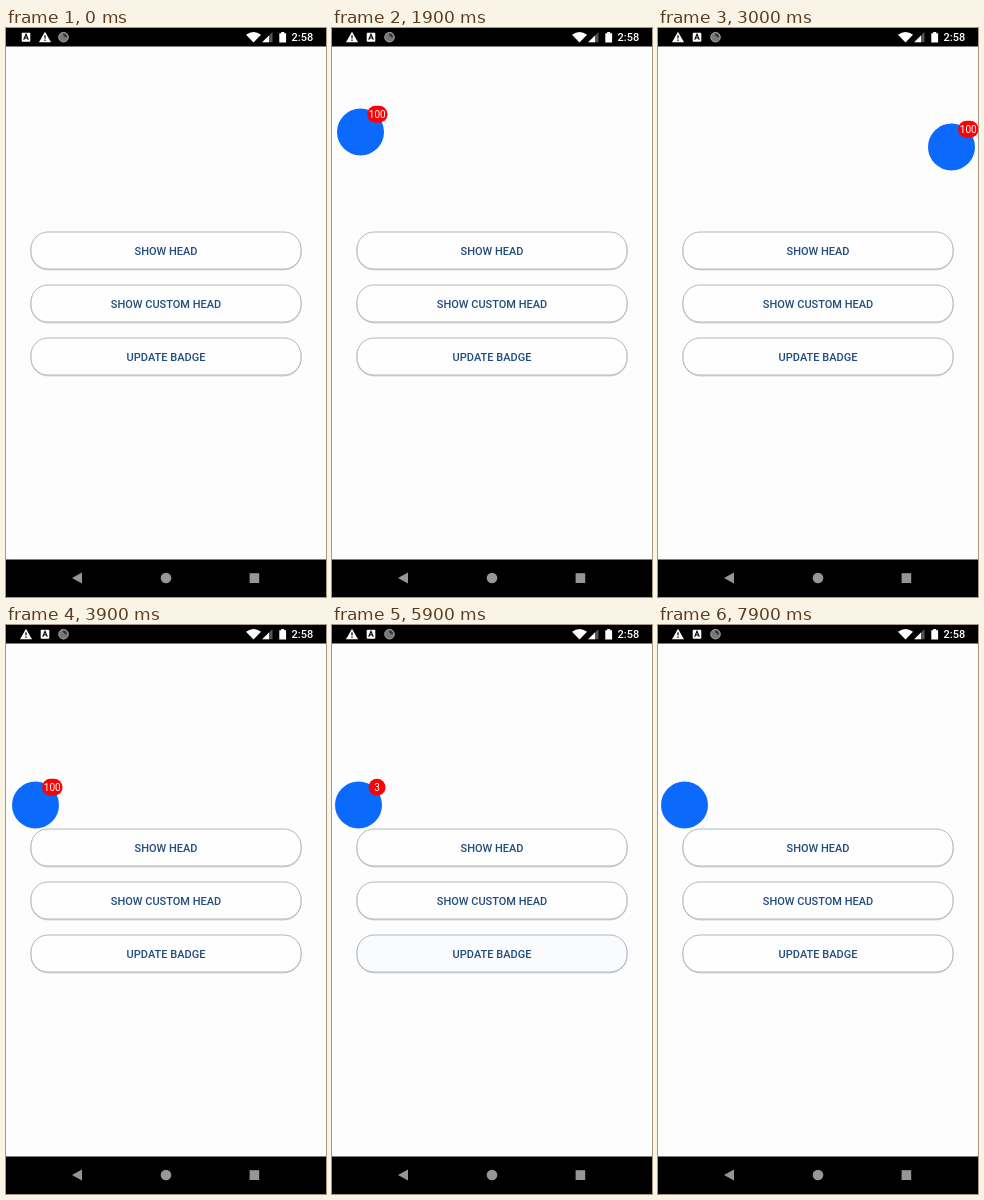
An HTML page that plays this animation: 320x569 px, repeating every 8000 ms.

```html
<!DOCTYPE html>
<html lang="en">
<head>
<meta charset="utf-8">
<title>Floating head demo</title>
<style>
  html, body { margin: 0; width: 100%; height: 100%; overflow: hidden; background: #fdfdfd; }
  svg { display: block; width: 320px; height: 569px; font-family: Roboto, sans-serif; }
  .label { font-size: 11px; font-weight: 500; fill: #204c7e; text-anchor: middle; }
</style>
</head>
<body>
<svg viewBox="0 0 320 569">
  <rect width="320" height="569" fill="#fdfdfd"/>
  <g id="buttons"></g>

  <!-- status bar -->
  <rect width="320" height="18.5"/>
  <g fill="#fff">
    <g id="keyIcon">
      <rect x="-4.3" y="4.7" width="8.6" height="9" rx="1"/>
      <path d="M-2.3 11.8L0 6.3L2.3 11.8M-1.4 10H1.4" fill="none" stroke="#000" stroke-width="1.1"/>
    </g>
    <g id="warnIcon">
      <path d="M0 3.8L6 14.2H-6Z"/>
      <path d="M0 7.2V10.6M0 11.6V12.9" stroke="#000" stroke-width="1.2"/>
    </g>
    <circle cx="57.5" cy="9.2" r="5" fill="#777"/>
    <circle cx="57.5" cy="9.2" r="4.8" fill="none" stroke="#aaa" stroke-width=".8"/>
    <path d="M57 5.4a3.8 3.8 0 0 1 4 4.2a4 4 0 0 1-4-4.2" fill="#333"/>
    <path d="M240 6.8Q247.5 1.4 255 6.8L247.5 14.5Z"/>
    <path d="M266.5 4V14.3H256.2Z" fill="#555"/>
    <path d="M263 7.5V14.3H256.2Z"/>
    <path d="M273.3 5.2H275.2V4H278.2V5.2H280.1V14.4H273.3Z"/>
    <text x="285.6" y="13.2" font-size="11" font-weight="500">2:58</text>
  </g>

  <!-- navigation bar -->
  <rect y="531.5" width="320" height="37.5"/>
  <g fill="#969696">
    <path d="M66 550L76 544.4V555.6Z"/>
    <circle cx="160" cy="550" r="5.3"/>
    <rect x="243.6" y="545.2" width="9.6" height="9.8"/>
  </g>

  <g id="head">
    <circle r="23.5" fill="#0b69fb"/>
    <g id="badge">
      <rect id="pill" y="-26.3" height="17" rx="8.5" fill="#fb0207"/>
      <text id="count" y="-14.3" font-size="10" fill="#fff" text-anchor="middle"></text>
    </g>
  </g>
</svg>
<script>
const $ = id => document.getElementById(id);
const LOOP = 8000, STEP = 100, PRESS = 400;

const labels = ['SHOW HEAD', 'SHOW CUSTOM HEAD', 'UPDATE BADGE'];
const taps = [[100], [], [4800, 5600, 6100, 6600, 7400]];
const counts = [100, 4, 3, 2, 1, 0];

// time, x, y of the head's centre
const path = [
  [0, 26.5, 104], [1800, 26.5, 104], [1900, 28.5, 104], [2000, 43, 105],
  [2200, 115, 112], [2400, 205, 118], [2600, 274, 119], [2700, 290, 119],
  [2800, 293.5, 119], [3100, 293.5, 119], [3200, 274, 123], [3400, 165, 154],
  [3600, 65.5, 178], [3700, 46, 180], [3800, 35, 180], [3900, 29.5, 180],
  [4000, 27.5, 180], [4200, 26.5, 180], [LOOP, 26.5, 180]
];

$('buttons').innerHTML = labels.map((text, i) => {
  const y = 204 + 53 * i;
  const box = (dy, attrs) =>
    `<rect x="25" y="${y + dy}" width="270" height="37" rx="17" ${attrs}/>`;
  return box(.9, 'fill="none" stroke="#000" stroke-opacity=".2"') +
    box(0, 'fill="#fefefe" stroke="#a3afbf" stroke-width=".9"') +
    box(0, 'class="ink" fill="#204c7e"') +
    `<text class="label" x="160" y="${y + 22.5}">${text}</text>`;
}).join('');
const inks = document.querySelectorAll('.ink');

function headAt(t) {
  const i = Math.max(1, path.findIndex(p => p[0] >= t));
  const [t0, x0, y0] = path[i - 1], [t1, x1, y1] = path[i];
  const k = (t - t0) / (t1 - t0);
  return [x0 + (x1 - x0) * k, y0 + (y1 - y0) * k];
}

function pressAt(t, starts) {
  const start = starts.find(s => t >= s && t < s + PRESS);
  return start === undefined ? 0 : .07 * (1 - (t - start) / PRESS);
}

function show(id, on) { $(id).style.display = on ? '' : 'none'; }
function move(id, x, y) { $(id).setAttribute('transform', `translate(${x} ${y})`); }

function draw(now) {
  const t = Math.floor(now % LOOP / STEP) * STEP;

  const swapped = t >= 1300;
  move('keyIcon', swapped ? 39 : 20, 0);
  move('warnIcon', swapped ? 20 : 39, 0);

  inks.forEach((ink, i) => ink.setAttribute('opacity', pressAt(t, taps[i])));

  show('head', t >= 400);
  move('head', ...headAt(t));

  const count = counts[taps[2].filter(s => t >= s).length];
  const width = count > 9 ? 20.4 : 17;
  show('badge', count > 0);
  $('pill').setAttribute('x', 27 - width);
  $('pill').setAttribute('width', width);
  $('count').setAttribute('x', 27 - width / 2);
  $('count').textContent = count;

  requestAnimationFrame(draw);
}
requestAnimationFrame(draw);
</script>
</body>
</html>
```
